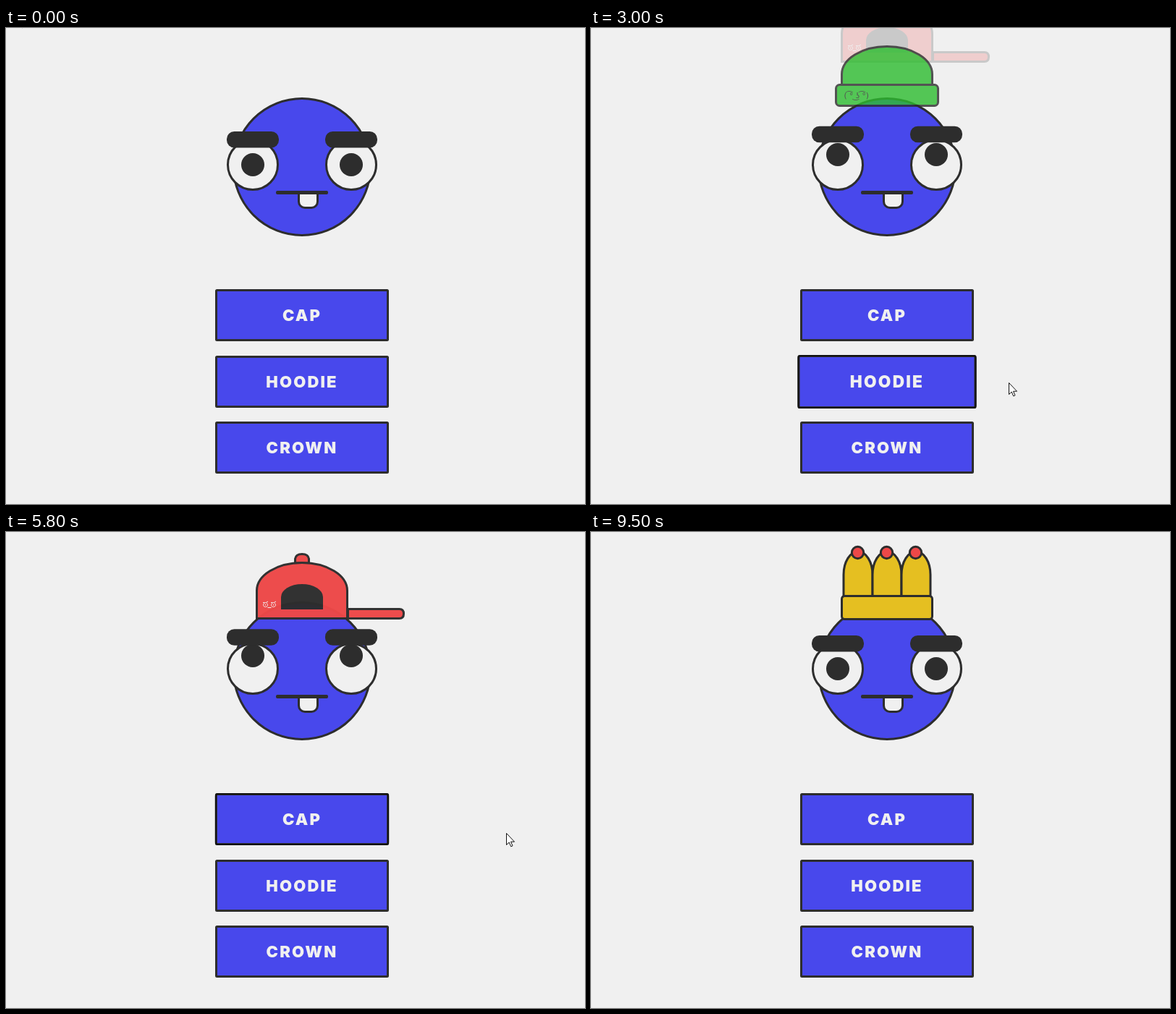
An HTML page that plays this animation: 800x658 px, repeating every 9700 ms.

```html
<!DOCTYPE html>
<html lang="en">
<head>
<meta charset="utf-8">
<title>Hat picker</title>
<style>
  html, body { margin: 0; width: 100%; height: 100%; overflow: hidden; background: #f0f0f0; }
  svg { display: block; }
  .line { stroke: #2d2d2d; stroke-width: 3; }
  .ring { fill: none; stroke: #101010; stroke-width: 2; }
  .dark { fill: #2d2d2d; }
  .blue { fill: #4848ec; }
  .white { fill: #f0f0f0; }
  .red { fill: #ed4848; }
  .green { fill: #2ebd30; }
  .gold { fill: #e5bf21; }
  .label { font: 900 22px Inter, "Open Sans", sans-serif; letter-spacing: 2.2px; text-anchor: middle; fill: #f0f0f0; }
  .lenny { font: 10.6px "DejaVu Sans", sans-serif; }
</style>
</head>
<body>
<svg width="800" height="658" viewBox="0 0 800 658">
  <defs>
    <circle id="eye" class="line white" cy="189" r="34.5"/>
    <circle id="pupil" cy="189" r="16"/>
    <rect id="brow" x="-36" y="143" width="72" height="22.5" rx="10.5"/>
    <path id="dome" class="line" d="M346.5 122.5V84A62.5 38.5 0 0 1 471.5 84V122.5Z"/>
    <g id="spike" class="line">
      <path class="gold" d="M349 90V59A20 32 0 0 1 389 59V90Z"/>
      <circle class="red" cx="368.5" cy="28.5" r="8.2"/>
    </g>
    <path id="stare" d="M355 100.5q4 1.5 7-1.5M357 101.5a3 2.7 0 1 0 3 0M358.5 103v1.5" fill="none" stroke="#f0f0f0"/>
  </defs>

  <circle class="line blue" cx="409" cy="192" r="94.5"/>
  <use href="#eye" x="341"/>
  <use href="#eye" x="477"/>
  <g id="pupils" class="dark"><use href="#pupil" x="341"/><use href="#pupil" x="477"/></g>
  <g id="brows" class="dark"><use href="#brow" x="341"/><use href="#brow" x="477"/></g>
  <path class="line white" d="M404.5 227V240A8.500 8.500 0 0 0 413 248.500H422A8.500 8.500 0 0 0 430.500 240V227Z"/>
  <rect class="dark" x="373" y="225" width="72" height="5" rx="2"/>

  <g id="cap">
    <path class="line red" d="M472.5 109.5H543.5Q549.5 109.5 549.5 116T543.5 122.5H472.5Z"/>
    <path class="line red" d="M399.5 46V40Q400.5 33.5 409 33.5T418.5 40V46Z"/>
    <use href="#dome" class="red"/>
    <path class="dark" d="M380 110V93A29 18 0 0 1 438 93V110Z"/>
    <use href="#stare"/>
    <use href="#stare" x="11"/>
    <path d="M361.5 107.5h5" stroke="#f0f0f0"/>
  </g>
  <g id="hoodie">
    <use href="#dome" class="green" y="-1"/>
    <rect class="line green" x="338.5" y="97.5" width="141" height="29" rx="5"/>
    <text class="dark lenny" x="349.5" y="115.500">( ͡° ͜ʖ ͡°)</text>
  </g>
  <g id="crown">
    <use href="#spike"/>
    <use href="#spike" x="40"/>
    <use href="#spike" x="80"/>
    <rect class="line gold" x="346.5" y="88.5" width="125" height="32" rx="4"/>
  </g>

  <g id="buttons"></g>
  <path id="cursor" d="M.5 .5V16.5L4.2 13L6.7 18.8L9 17.8L6.5 12.2H11.5Z" fill="#fff" stroke="#111"/>
</svg>
<script>
const LOOP = 9700, STEP = 100, BLUR = 9450;
const HAT = 500, HOVER = 300, ENTER = 290, LEAVE = 140;
const $ = id => document.getElementById(id);

const options = ['cap', 'hoodie', 'crown'].map((id, i) => {
  $('buttons').insertAdjacentHTML('beforeend', `<g>
    <rect class="line blue" x="-118.5" y="-34.5" width="237" height="69" rx="1"/>
    <rect class="ring" x="-119" y="-35" width="238" height="70" rx="3"/>
    <text class="label" y="8">${id.toUpperCase()}</text></g>`);
  const button = $('buttons').lastElementChild;
  return { hat: $(id), drop: id === 'crown' ? 140 : 95, y: Math.round(397 + 91.5 * i), button, ring: button.children[1] };
});

// Each visit clicks an option, then the pointer moves away to a point
const visits = [
  { pick: 0, click: 960, away: [1900, 626, 310] },
  { pick: 1, click: 2750, away: [3100, 608, 490] },
  { pick: 2, click: 4120, away: [4200, 598, 581] },
  { pick: 0, click: 5405, away: [5800, 691, 416] },
  { pick: 1, click: 6732, away: [6900, 624, 496] },
  { pick: 2, click: 7890, away: [8200, 686, 496] }
];
const path = [
  [0, 16, -19],
  ...visits.flatMap(v => [[v.click, 500, options[v.pick].y], v.away]),
  [8500, 685, 417], [9000, 46, 9], [9100, -30, -40]
];

const clamp = v => Math.max(0, Math.min(1, v));
const mix = (a, b, k) => a + (b - a) * k;
const move = (el, y) => el.setAttribute('transform', `translate(0 ${y})`);

// CSS "ease": cubic-bezier(.25, .1, .25, 1)
function ease(v) {
  v = clamp(v);
  let lo = 0, hi = 1;
  const bez = (s, a, b) => 3 * s * (1 - s) ** 2 * a + 3 * s * s * (1 - s) * b + s ** 3;
  for (let i = 0; i < 20; i++) {
    const mid = (lo + hi) / 2;
    if (bez(mid, .25, .25) < v) lo = mid; else hi = mid;
  }
  return bez(lo, .1, 1);
}

function pointer(t) {
  const i = path.findIndex(p => p[0] > t);
  if (i < 0) return path[path.length - 1].slice(1);
  const [a, b] = [path[i - 1], path[i]], k = (t - a[0]) / (b[0] - a[0]);
  return [mix(a[1], b[1], k), mix(a[2], b[2], k)];
}

function draw(t) {
  const [now, before] = visits.filter(v => v.click <= t).reverse();
  const age = now ? t - now.click : LOOP;
  const change = ease(age / HAT);

  options.forEach((o, i) => {
    const shown = now?.pick === i ? change : before?.pick === i ? 1 - change : 0;
    move(o.hat, Math.round(-o.drop * (1 - shown)));
    o.hat.setAttribute('opacity', shown);

    let hover = 0;
    for (const v of visits)
      if (v.pick === i) hover += ease((t - v.click + ENTER) / HOVER) - ease((t - v.click - LEAVE) / HOVER);
    o.button.setAttribute('transform', `translate(409 ${o.y}) scale(${1 + .08 * hover})`);
    o.ring.setAttribute('opacity', now?.pick === i && t < BLUR ? clamp(age / 160) : 0);
  });

  const fall = ease((age - 950) / 230);
  move($('pupils'), Math.round(-19 * (ease((age - 20) / HAT) - fall)));
  move($('brows'), -9 * (change - fall));
  $('cursor').setAttribute('transform', `translate(${pointer(t).map(Math.round)})`);
}

const start = performance.now();
function tick() {
  const t = (performance.now() - start) % LOOP;
  draw(Math.floor(t / STEP) * STEP);
  requestAnimationFrame(tick);
}
tick();
</script>
</body>
</html>
```
